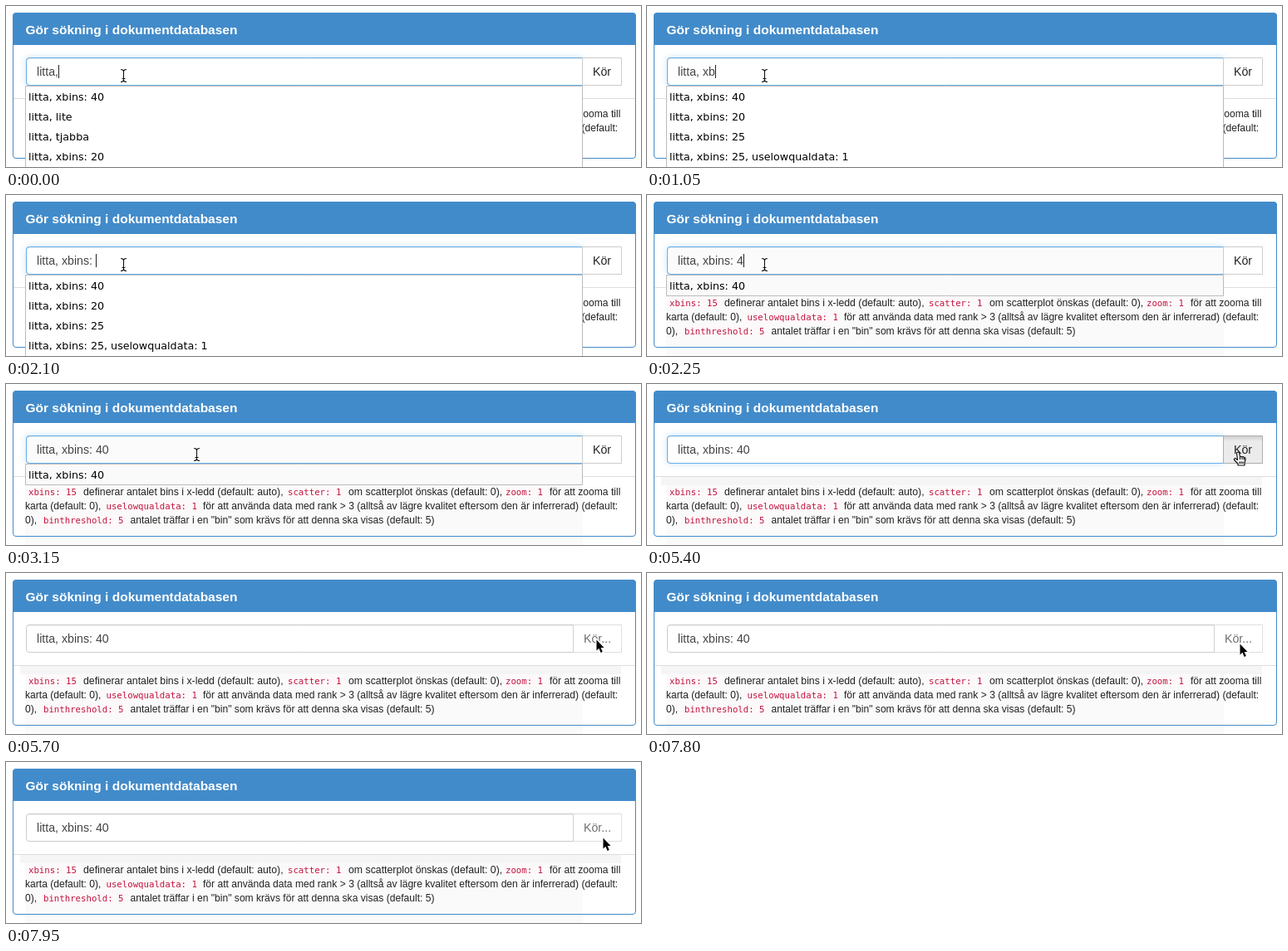
An HTML page with a canvas for the animation above (8 s loop, 764x194 px).

```html
<!DOCTYPE html>
<html lang="sv">
<head>
<meta charset="utf-8">
<style>
html, body { margin: 0; width: 100%; height: 100%; overflow: hidden; background: #fff; }
canvas { display: block; }
</style>
</head>
<body>
<canvas id="stage" width="764" height="194"></canvas>
<script>
const ctx = document.getElementById('stage').getContext('2d');
const LOOP = 8000;
const SANS = '"Liberation Sans", sans-serif';
const LIST = '12.7px "DejaVu Sans", sans-serif';
const MONO = '10.7px "DejaVu Sans Mono", monospace';
const QUERY = 'litta, xbins: 40';

// Timelines: [start in ms, value...]; each value holds until the next.
const typed = [[0, 6], [300, 7], [600, 8], [1050, 9], [1200, 10], [1500, 12],
  [1950, 13], [2100, 14], [2250, 15], [2400, 16]];
const caret = [[0, true], [2850, false], [3450, true], [3900, false], [4500, true], [5400, false]];
const suggestions = [
  [0, ['litta, xbins: 40', 'litta, lite', 'litta, tjabba', 'litta, xbins: 20']],
  [600, ['litta, xbins: 40', 'litta, xbins: 20', 'litta, xbins: 25', 'litta, xbins: 25, uselowqualdata: 1']],
  [2250, ['litta, xbins: 40']],
  [5400, []]
];
const button = [[0, 'idle'], [4800, 'hover'], [5400, 'pressed'], [5550, 'busy']];
const focus = [[0, 1], [5550, 0.4], [5700, 0]];
const inputFill = [[0, '#fff'], [2250, '#fbfbfb'], [5400, '#fff']];
const pointer = [
  [0, 141, 84, 'beam'], [3000, 175, 84, 'beam'], [3150, 229, 85, 'beam'],
  [3300, 330, 86, 'beam'], [3450, 436, 86, 'beam'], [3750, 470, 84, 'beam'],
  [3900, 530, 80, 'beam'], [4050, 590, 76, 'beam'], [4200, 630, 73, 'beam'],
  [4350, 655, 73, 'beam'], [4500, 668, 75, 'beam'], [4650, 674, 77, 'beam'],
  [4800, 698, 81, 'hand'], [4950, 707, 83, 'hand'], [5100, 711, 82, 'hand'],
  [5550, 710, 80, 'arrow'], [7800, 713, 85, 'arrow'], [7950, 718, 91, 'arrow']
];

function at(track, t) {
  let current = track[0];
  for (const key of track) if (key[0] <= t) current = key;
  return current.slice(1);
}

function text(str, x, y, font, color) {
  ctx.font = font;
  ctx.fillStyle = color;
  ctx.fillText(str, x, y);
}

function rect(x, y, w, h, color) {
  ctx.fillStyle = color;
  ctx.fillRect(x, y, w, h);
}

function box(x, y, w, h, radii, fill, stroke) {
  ctx.beginPath();
  ctx.roundRect(x + 0.5, y + 0.5, w - 1, h - 1, radii);
  if (fill) { ctx.fillStyle = fill; ctx.fill(); }
  if (stroke) { ctx.strokeStyle = stroke; ctx.lineWidth = 1; ctx.stroke(); }
}

function drawPanel(t) {
  rect(0, 0, 764, 194, '#fff');
  if (t >= 2250) rect(23, 122, 671, 72, '#fafafa');
  if (t >= 5400) rect(17, 112, 723, 10, '#f5f5f5');
  box(8, 8, 750, 176, 3.5, null, '#428bca');
  box(8, 8, 750, 39, [3.5, 3.5, 0, 0], '#428bca', '#428bca');
  text('Gör sökning i dokumentdatabasen', 23.5, 34, 'bold 15.5px ' + SANS, '#fff');
  rect(9, 111, 748, 1, '#ddd');
}

function drawHelp() {
  const say = (str, x, y, size = 12.1) => text(str, x, y, `${size}px ${SANS}`, '#222');
  const code = (str, x, y) => {
    ctx.font = MONO;
    box(x - 4, y - 11, ctx.measureText(str).width + 7, 15, 3, '#fdf9fa');
    text(str, x, y, MONO, '#c0143f');
  };
  code('xbins: 15', 27, 134);
  say('definerar antalet bins i x-ledd (default: auto),', 93, 134, 12.3);
  code('scatter: 1', 339, 134);
  say('om scatterplot önskas (default: 0),', 412, 134, 12.3);
  code('zoom: 1', 601, 134);
  say('för att zooma till', 654, 134);
  say('karta (default: 0),', 23, 151);
  code('uselowqualdata: 1', 120.5, 151);
  say('för att använda data med rank > 3 (alltså av lägre kvalitet eftersom den är inferrerad) (default:', 237, 151);
  say('0),', 23, 168);
  code('binthreshold: 5', 45, 168);
  say('antalet träffar i en "bin" som krävs för att denna ska visas (default: 5)', 149.5, 168);
}

function drawInput(t, width) {
  const [glow] = at(focus, t);
  const [length] = at(typed, t);
  const [fill] = at(inputFill, t);
  const radii = [3.5, 0, 0, 3.5];
  if (glow) {
    ctx.save();
    ctx.shadowColor = `rgba(102,175,233,${0.4 * glow})`;
    ctx.shadowBlur = 8;
    box(24, 62, width, 34, radii, '#fff');
    ctx.restore();
  }
  box(24, 62, width, 34, radii, fill, '#ccc');
  rect(26, 63, width - 3, 1, 'rgba(0,0,0,.06)');
  if (glow) box(24, 62, width, 34, radii, null, `rgba(102,175,233,${glow})`);

  const str = QUERY.slice(0, length);
  text(str, 37, 84, '14.2px ' + SANS, '#444');
  if (at(caret, t)[0]) rect(Math.round(37.3 + ctx.measureText(str).width), 71, 1, 16, '#222');
}

function drawButton(state, x) {
  const lit = state === 'hover' || state === 'pressed';
  ctx.save();
  if (state === 'busy') ctx.globalAlpha = 0.65;
  box(x, 62, 741 - x, 34, 0, lit ? '#ebebeb' : '#fff', lit ? '#adadad' : '#ccc');
  if (state === 'pressed') {
    const shade = ctx.createLinearGradient(0, 63, 0, 69);
    shade.addColorStop(0, 'rgba(0,0,0,.12)');
    shade.addColorStop(1, 'rgba(0,0,0,0)');
    rect(x + 1, 63, 739 - x, 6, shade);
  }
  text(state === 'busy' ? 'Kör...' : 'Kör', x + 13, 84, '14.2px ' + SANS, '#222');
  ctx.restore();
}

function drawSuggestions(items) {
  if (!items.length) return;
  const open = items.length > 1;
  box(23, 96, 671, open ? 110 : 26, 0, open ? '#fff' : '#fafafa', '#bbb');
  items.forEach((item, i) => text(item, 27, 114 + i * 24, LIST, '#000'));
}

const shapes = {
  beam: new Path2D('M-3 -7.5Q0 -7.5 0.5 -5.5Q1 -7.5 4 -7.5M0.5 -5.5V5.5M-3 7.5Q0 7.5 0.5 5.5Q1 7.5 4 7.5M-1.5 3.5H2.5'),
  arrow: new Path2D('M0.5 0.5V13.5L3.4 10.8L5.6 16L7.8 15L5.6 10H9.5Z'),
  hand: new Path2D('M-1.5 1Q0 -1 1.5 1L2.5 6Q4 4.5 5 6Q6.5 5 7.5 6.7Q9.5 6.5 9 9L8 13V16H0V14L-4.5 9.5Q-5 7 -2.5 8L-0.5 9.5Z')
};

function drawPointer([x, y, kind]) {
  const shape = shapes[kind];
  ctx.save();
  ctx.translate(x, y);
  ctx.lineJoin = 'round';
  if (kind === 'hand') {
    ctx.fillStyle = '#fff';
    ctx.fill(shape);
    ctx.strokeStyle = '#111';
    ctx.lineWidth = 1.2;
    ctx.stroke(shape);
    ctx.stroke(new Path2D('M2.5 6V9M5 6.5V9M7.3 7V9.5M2 11.5V14M4 11.5V14M6 11.5V14'));
  } else {
    ctx.strokeStyle = '#fff';
    ctx.lineWidth = 3;
    ctx.stroke(shape);
    if (kind === 'beam') {
      ctx.strokeStyle = '#111';
      ctx.lineWidth = 1.1;
      ctx.stroke(shape);
    } else {
      ctx.fillStyle = '#000';
      ctx.fill(shape);
    }
  }
  ctx.restore();
}

function draw(t) {
  const [state] = at(button, t);
  const buttonX = state === 'busy' ? 682 : 693;
  drawPanel(t);
  drawHelp();
  drawInput(t, buttonX - 23);
  drawButton(state, buttonX);
  drawSuggestions(at(suggestions, t)[0]);
  drawPointer(at(pointer, t));
}

const start = performance.now();
function tick() {
  draw((performance.now() - start) % LOOP);
  requestAnimationFrame(tick);
}
tick();
</script>
</body>
</html>
```
